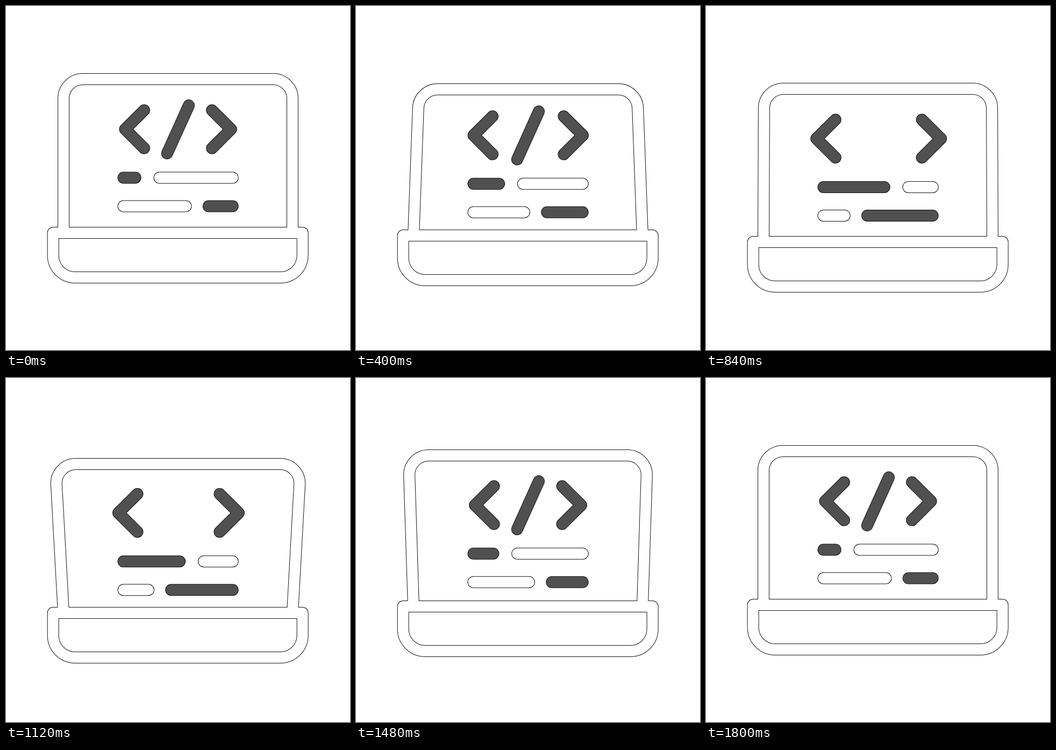
These frames come from a looping animation (640 by 640 pixels, 2 s). An HTML page with a canvas:

```html
<!DOCTYPE html>
<html lang="en">
<head>
<meta charset="utf-8">
<title>Laptop code icon</title>
<style>
  html, body { margin: 0; width: 100%; height: 100%; overflow: hidden; background: #fff; }
  canvas { display: block; width: 640px; height: 640px; }
</style>
</head>
<body>
<canvas id="stage" width="640" height="640"></canvas>
<script>
const ctx = document.getElementById("stage").getContext("2d");
const LOOP = 2000, STEP = 40;
const EDGE = "#151515", LIGHT = "#fff", DARK = "#505050";

const clamp = v => Math.min(1, Math.max(0, v));
const smooth = u => u * u * (3 - 2 * u);

// Same curve as cubic-bezier(.5, 0, .5, 1)
function strong(u) {
  let lo = 0, hi = 1;
  for (let i = 0; i < 24; i++) {
    const s = (lo + hi) / 2;
    if (1.5 * s - 1.5 * s * s + s * s * s < u) lo = s; else hi = s;
  }
  return smooth(lo);
}

// Rises from 0 to 1 between a and b, falls back between b and c
const pulse = (t, a, b, c, ease) =>
  t < b ? ease(clamp((t - a) / (b - a))) : 1 - ease(clamp((t - b) / (c - b)));

function line(...pts) {
  const path = new Path2D();
  pts.forEach(([x, y]) => path.lineTo(x, y));
  return path;
}

function tube(paths, color) {
  for (const [style, width] of [[EDGE, 22], [color, 20]]) {
    ctx.strokeStyle = style;
    ctx.lineWidth = width;
    paths.forEach(p => ctx.stroke(p));
  }
}

// Horizontal edges sit on whole pixels so their thin lines stay crisp
function lidPath(base, drop, tilt) {
  const top = Math.round(base - 286 + drop);
  const left = 107 - tilt * 1.18, right = 640 - left;
  const path = new Path2D();
  path.moveTo(107, base);
  path.arcTo(left, top, 320, top, 36);
  path.arcTo(right, top, 533, base, 36);
  path.lineTo(533, base);
  return path;
}

function basePath(y) {
  const left = 87.6, right = 551.7, bottom = y + 83;
  const path = new Path2D();
  path.moveTo(left, y);
  path.lineTo(right, y);
  path.arcTo(right, bottom, 320, bottom, 41);
  path.arcTo(left, bottom, left, y, 41);
  path.closePath();
  return path;
}

function draw(t) {
  const sink = 17 * pulse(t, 80, 920, 1760, strong);
  const back = pulse(t, 40, 490, 920, smooth);
  const front = pulse(t, 920, 1200, 1740, smooth);
  const grow = pulse(t, 80, 920, 1720, strong);
  const spread = pulse(t, 180, 880, 1560, strong);
  const cut = t < 900 ? smooth(clamp((t - 580) / 200)) : 1 - smooth(clamp((t - 1140) / 240));

  ctx.fillStyle = LIGHT;
  ctx.fillRect(0, 0, 640, 640);
  ctx.lineJoin = "round";

  const base = Math.round(422 + sink);
  ctx.lineCap = "butt";
  tube([lidPath(base, 15.6 * back + 11.5 * front, 16.2 * front - 9.5 * back), basePath(base)], LIGHT);

  ctx.save();
  ctx.translate(0, sink + 7.3 * back + 7.9 * front);
  ctx.lineCap = "round";

  const bracket = (tip, end) => line([end, 194], [tip, 229.3], [end, 264.6]);
  const l = 16.3 * spread, r = 18.6 * spread;
  tube([bracket(221.5 - l, 257 - l), bracket(418.7 + r, 383.2 + r)], DARK);

  if (cut < 1) {
    const k = 1 - cut, dx = 20.2 * k, dy = 44.7 * k;
    tube([line([320 + dx, 229.6 - dy], [320 - dx, 229.6 + dy])], DARK);
  }

  const up = 92.3 * grow, low = 77.8 * grow;
  const bar = (x1, x2, y, color) => tube([line([x1, y], [x2, y])], color);
  bar(218.5, 240.7 + up, 319.5, DARK);
  bar(285.5 + up, 421.7, 319.5, LIGHT);
  bar(218.5, 334.5 - low, 372.5, LIGHT);
  bar(376.8 - low, 421.7, 372.5, DARK);
  ctx.restore();
}

function tick() {
  const t = performance.now() % LOOP;
  draw(Math.floor(t / STEP) * STEP);
  requestAnimationFrame(tick);
}
tick();
</script>
</body>
</html>
```
